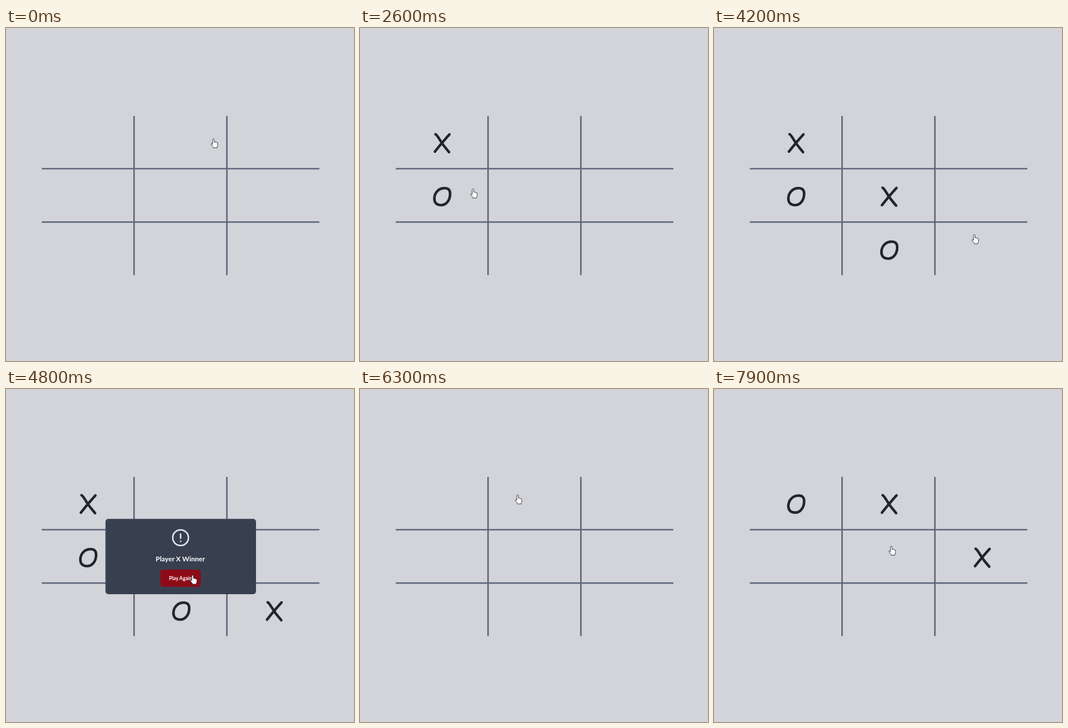
These frames come from a looping animation (593 by 568 pixels, 8 s). An HTML page:

```html
<!DOCTYPE html>
<html lang="en">
<head>
<meta charset="utf-8">
<title>Tic-tac-toe</title>
<style>
  html, body { margin: 0; width: 100%; height: 100%; overflow: hidden; background: #d2d4d9; }
  svg { display: block; width: 100vw; height: 100vh; }
  text { font-family: Lato, "Open Sans", sans-serif; font-weight: 700; fill: #fff; text-anchor: middle; }
  .mark { fill: none; stroke: #22252b; stroke-width: 4.4; stroke-linecap: round; stroke-linejoin: round; }
</style>
</head>
<body>
<svg viewBox="0 0 593 568">
  <defs>
    <path id="X" class="mark" d="M-11.3-15.2Q-9.5-14.5-6-9Q2 4.5 11.8 15.2M12.4-15Q1-2.5-12.4 14.3"/>
    <path id="O" class="mark" d="M2.5-14.6C10.5-15.3 13.7-11.5 13.6-5C13.5 6 7 14.4-2 14.3C-9.5 14.2-13.4 9.8-13.3 3C-13.1-7-6-14 2.5-14.6Z"/>
  </defs>
  <g fill="none" stroke="#5b6579" stroke-width="2.5">
    <path d="M218.2 150V421.5M376.4 150V421.5M61 331.1H534"/>
    <path d="M61 240H534" stroke="#66647e"/>
  </g>
  <g id="marks"></g>
  <g id="dialog">
    <rect x="169.5" y="221.5" width="256.5" height="128.5" rx="5" fill="#384050"/>
    <g fill="none" stroke="#e4e8f0" stroke-width="2.5" stroke-linecap="round">
      <circle cx="297.5" cy="253.7" r="13.4"/>
      <path d="M297.5 247.5V254.5M297.5 259.8V260"/>
    </g>
    <text x="297" y="293.8" font-size="11.6">Player X Winner</text>
    <rect x="263" y="308" width="69" height="29.5" rx="5" fill="#8d0b18"/>
    <text x="298.5" y="326" font-size="8.5">Play Again!</text>
  </g>
  <path id="hand" fill="#fff" stroke="#25272e" stroke-width=".9" stroke-linejoin="round"
    d="M-1.4 9.5V1.3Q-1.3 0 0 0Q1.3 0 1.4 1.3V5.6Q2.6 4.7 3.6 6Q4.8 5.2 5.7 6.6Q7.3 6.2 7.3 8V11Q7.2 13 6.1 14V15.5H-.2V14.4Q-1.8 13-3.6 9.8Q-4.2 8.3-3 8Q-2.2 8-1.4 9.5Z"/>
</svg>
<script>
const LOOP = 8000, STEP = 100;

// each game: end time and its turns as time: cell (0 to 8); X begins, then they alternate
const GAMES = [
  { end: 5000, turns: { 1800: 0, 2300: 3, 3300: 4, 3600: 7, 4300: 8 } },
  { end: LOOP, turns: { 6400: 1, 6800: 0, 7300: 5 } }
];
const DIALOG = { from: 4400, until: 5000 };

// where the fingertip stops: arrival time, x, y, rest
const STOPS = [
  [0, 353.5, 189, 600], [1000, 323.5, 193.5, 200], [1400, 308, 256],
  [1600, 159.5, 210.5], [1900, 144, 196], [2400, 179.5, 265, 100],
  [2600, 192.5, 274.5], [2700, 227, 293, 100], [3000, 269, 287, 100],
  [3600, 305, 366], [3800, 443.5, 352.5, 400], [4800, 318, 317.5, 200],
  [5900, 164, 197], [6300, 268.5, 180.5, 100], [6800, 145, 180],
  [7300, 448, 274], [7900, 302, 268]
];

const byId = id => document.getElementById(id);
const show = (el, { from, until }, t) =>
  el.setAttribute("visibility", t >= from && t < until ? "visible" : "hidden");
const place = (el, x, y) => el.setAttribute("transform", `translate(${x} ${y})`);

function addMark(symbol, cell) {
  const el = document.createElementNS("http://www.w3.org/2000/svg", "use");
  el.setAttribute("href", "#" + symbol);
  place(el, 140 + cell % 3 * 158.6, 196.5 + Math.floor(cell / 3) * 91.3);
  return byId("marks").appendChild(el);
}

const marks = GAMES.flatMap(({ end, turns }) =>
  Object.entries(turns).map(([time, cell], i) =>
    ({ el: addMark("XO"[i % 2], cell), from: +time, until: end })));

function fingertip(t) {
  const i = STOPS.findLastIndex(stop => stop[0] <= t);
  const [t0, x0, y0, rest = 0] = STOPS[i];
  const [t1, x1, y1] = STOPS[i + 1] || [LOOP, x0, y0];
  const k = Math.max(0, (t - t0 - rest) / (t1 - t0 - rest));
  const ease = k * k * (3 - 2 * k);
  return [x0 + (x1 - x0) * ease, y0 + (y1 - y0) * ease];
}

function draw(now) {
  const t = Math.floor(now % LOOP / STEP) * STEP;
  marks.forEach(mark => show(mark.el, mark, t));
  show(byId("dialog"), DIALOG, t);
  place(byId("hand"), ...fingertip(t));
}

const start = performance.now();
function tick() {
  draw(performance.now() - start);
  requestAnimationFrame(tick);
}
tick();
</script>
</body>
</html>
```
